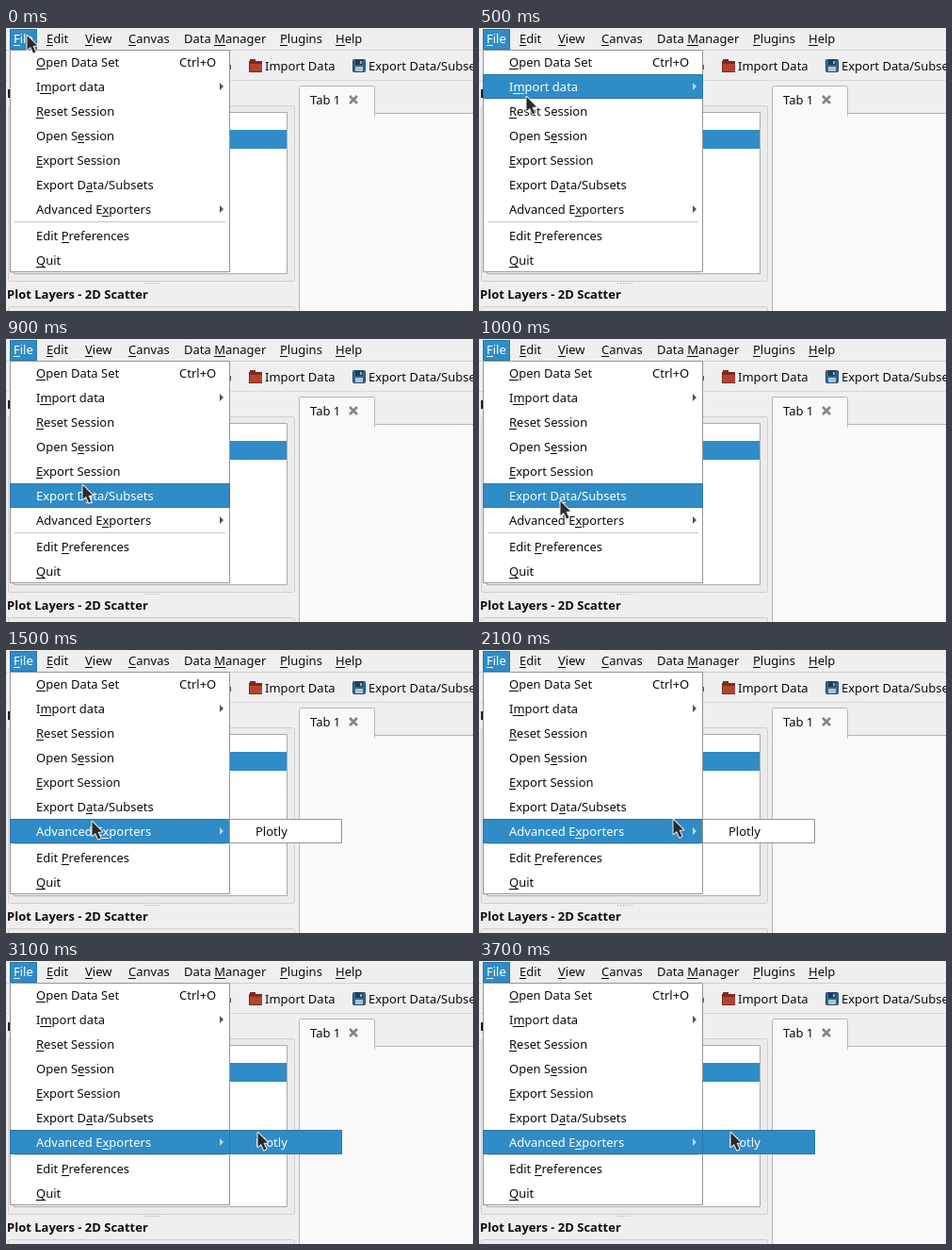
An HTML page with a canvas that plays this animation: 496x300 px, repeating every 4 s.

```html
<!DOCTYPE html>
<html lang="en">
<head>
<meta charset="utf-8">
<title>File menu</title>
<style>
html, body { margin: 0; width: 496px; height: 300px; overflow: hidden; }
canvas { display: block; }
</style>
</head>
<body>
<canvas id="stage" width="496" height="300"></canvas>
<script>
const ctx = document.getElementById('stage').getContext('2d');
const BLUE = '#308cc6', EDGE = '#2a76a8', INK = '#0c0c0c', LINE = '#b6b6b6', FRAME = '#959595';
const FONT = '13px "Noto Sans", sans-serif';

// top, text (& marks the mnemonic), opens a submenu
const items = [
  [23, '&Open Data Set'],
  [49, 'I&mport data', true],
  [75, '&Reset Session'],
  [101, 'Open S&ession'],
  [127, '&Export Session'],
  [153, 'Export D&ata/Subsets'],
  [179, 'Advanced E&xporters', true],
  [207, 'Edit &Preferences'],
  [233, '&Quit']
];
const ADVANCED = 6, SUBMENU_AT = 1400, LOOP = 4000;

// pointer path: time, x, y, speed x, speed y (px per ms)
const path = [
  [0, 22, 8, 0, 0],
  [700, 68, 114, .085, .2],
  [1000, 86, 172, .04, .14],
  [1200, 91, 182, 0, 0],
  [1500, 91, 182, 0, 0],
  [2100, 206, 180, .253, 0],
  [2500, 267, 182, 0, 0],
  [LOOP, 267, 182, 0, 0]
];

function pointer(t) {
  const i = path.findIndex(k => k[0] > t);
  const a = path[i - 1], b = path[i], h = b[0] - a[0], u = (t - a[0]) / h;
  const s = u * u * (3 - 2 * u), out = u * (1 - u) ** 2 * h, into = u * u * (u - 1) * h;
  const axis = n => Math.round(a[n] + (b[n] - a[n]) * s + a[n + 2] * out + b[n + 2] * into);
  return [axis(1), axis(2)];
}

function box(x, y, w, h, fill, edge) {
  ctx.fillStyle = fill;
  ctx.fillRect(x, y, w, h);
  if (edge) {
    ctx.strokeStyle = edge;
    ctx.lineWidth = 1;
    ctx.strokeRect(x + .5, y + .5, w - 1, h - 1);
  }
}

function panel(x, y, w, h, r, fill, edge) {
  ctx.beginPath();
  ctx.roundRect(x + .5, y + .5, w - 1, h - 1, r);
  ctx.fillStyle = fill;
  ctx.fill();
  ctx.strokeStyle = edge;
  ctx.lineWidth = 1;
  ctx.stroke();
}

function shape(points, x, y, fill, edge) {
  ctx.beginPath();
  points.forEach(([px, py]) => ctx.lineTo(x + px, y + py));
  ctx.closePath();
  if (edge) {
    ctx.strokeStyle = edge;
    ctx.lineWidth = 2;
    ctx.lineJoin = 'round';
    ctx.stroke();
  }
  ctx.fillStyle = fill;
  ctx.fill();
}

function label(text, x, y, color = INK, weight = '') {
  const at = text.indexOf('&'), plain = text.replace('&', '');
  ctx.font = weight + ' ' + FONT;
  ctx.fillStyle = color;
  ctx.fillText(plain, x, y);
  if (at < 0) return;
  const start = x + ctx.measureText(plain.slice(0, at)).width;
  const width = ctx.measureText(plain[at]).width;
  ctx.fillRect(Math.round(start), y + 2, Math.round(width), 1);
}

function drawWindow() {
  box(0, 0, 496, 300, '#efefef');
  box(0, 23, 496, 1, '#d0d0d0');
  box(0, 55, 496, 1, '#d8d8d8');

  box(4, 1, 29, 22, BLUE, EDGE);
  label('&File', 8, 16, '#fff');
  [['&Edit', 43], ['&View', 84], ['&Canvas', 130], ['Data &Manager', 189],
   ['&Plugins', 291], ['&Help', 350]].forEach(([s, x]) => label(s, x, 16));

  // toolbar
  box(238, 39, 1, 5, '#555');
  box(259, 33, 6, 3, '#7d2a20');
  box(258, 35, 14, 12, '#7d2a20');
  box(259, 38, 13, 8, '#b4432f');
  label('Import Data', 275, 45);
  panel(368, 33, 14, 14, 1, '#37668a', '#234a68');
  box(371, 34, 8, 5, '#1f3d54');
  box(376, 35, 2, 3, '#7fb2d6');
  box(371, 41, 8, 5, '#a9c4d6');
  label('Export Data/Subsets', 385, 45);

  // left side
  label('Data Collection', 1, 74, INK, 'bold');
  panel(2, 82, 305, 187, 2, '#ebebeb', '#cfcfcf');
  box(8, 89, 291, 172, '#fff', '#a9a9a9');
  box(9, 108, 289, 20, BLUE);
  for (let x = 147; x < 164; x += 3) box(x, 270, 1, 1, '#aaa');
  label('Plot Layers - 2D Scatter', 1, 287, INK, 'bold');
  panel(2, 295, 305, 20, 2, '#ebebeb', '#cfcfcf');

  // tab area
  box(311, 90, 190, 215, '#f9f9f9', LINE);
  panel(311, 61, 81, 34, 2, '#f9f9f9', LINE);
  box(312, 90, 79, 8, '#f9f9f9');
  label('Tab 1', 323, 81);
  ctx.strokeStyle = '#858585';
  ctx.lineWidth = 2.6;
  ctx.beginPath();
  ctx.moveTo(365, 72); ctx.lineTo(373, 80);
  ctx.moveTo(373, 72); ctx.lineTo(365, 80);
  ctx.stroke();
}

function drawMenu(hover) {
  box(4, 23, 234, 236, '#fff', FRAME);
  box(9, 205, 224, 1, '#c3c3c3');
  items.forEach(([y, text, sub], i) => {
    const on = i === hover;
    if (on) box(4, y, 234, 26, BLUE, EDGE);
    label(text, 32, y + 18, on ? '#fff' : INK);
    if (sub) shape([[0, 0], [4, 4], [0, 8]], 227, y + 9, on ? '#b9d8ec' : '#555');
  });
  label('Ctrl+O', 184, 41);
}

function drawPointer(x, y) {
  shape([[0, 0], [0, 15], [3.5, 12], [6.5, 18.5], [9, 17.3], [6, 11], [10.5, 10.5]],
    x + .5, y, '#2b2b2b', '#eee');
}

function draw(t) {
  const [x, y] = pointer(t);
  const inSub = t >= SUBMENU_AT && x >= 238;
  const hover = inSub ? ADVANCED : items.findIndex(([top]) => y > top && y <= top + 26);
  drawWindow();
  drawMenu(hover);
  if (t >= SUBMENU_AT) {
    box(237, 179, 120, 26, inSub ? BLUE : '#fff', inSub ? EDGE : FRAME);
    label('Plotly', 265, 197, inSub ? '#fff' : INK);
  }
  drawPointer(x, y);
}

function tick() {
  // the picture advances ten times a second
  draw(Math.floor(performance.now() % LOOP / 100) * 100);
  requestAnimationFrame(tick);
}
tick();
</script>
</body>
</html>
```
